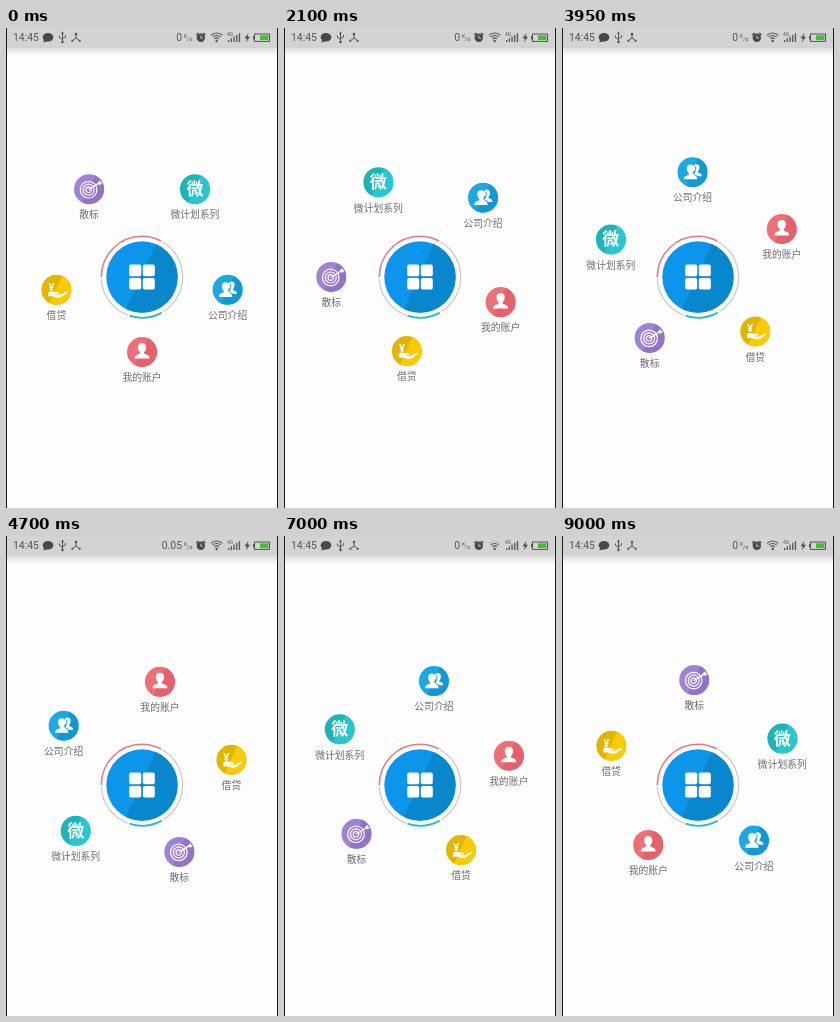
An HTML page with a canvas for the animation above (9.05 s loop, 272x480 px).

```html
<!DOCTYPE html>
<html lang="zh">
<head>
<meta charset="utf-8">
<style>
html, body { margin: 0; width: 100%; height: 100%; overflow: hidden; background: #fdfdfd; }
canvas { display: block; }
</style>
</head>
<body>
<canvas id="stage" width="272" height="480"></canvas>
<script>
const c = document.getElementById('stage').getContext('2d');
const LOOP = 9050, STEP = 50, TAU = 465, RAD = Math.PI / 180;
const CJK = '"Noto Sans CJK SC", "Noto Sans CJK", sans-serif';

// Each fling: start time and the angle it decays towards (counter-clockwise degrees)
const flings = [[1058, 474], [3109, 902.7], [4760, 1233], [5810, 1567.8], [7616, 1777.5]];

function turn(t) {
  let angle = 0;
  flings.forEach(([start, target], i) => {
    if (t <= start) return;
    const end = Math.min(t, i + 1 < flings.length ? flings[i + 1][0] : LOOP);
    angle = target - (target - angle) * Math.exp((start - end) / TAU);
  });
  return angle;
}

function disc(x, y, r, color) {
  c.fillStyle = color;
  c.beginPath();
  c.arc(x, y, r, 0, 7);
  c.fill();
}

function arc(x, y, r, from, to, color, width) {
  c.strokeStyle = color;
  c.lineWidth = width;
  c.beginPath();
  c.arc(x, y, r, from * RAD, to * RAD);
  c.stroke();
}

function shape(d, color) {
  c.fillStyle = color;
  c.fill(new Path2D(d));
}

function line(d, color, width) {
  c.strokeStyle = color;
  c.lineWidth = width;
  c.stroke(new Path2D(d));
}

function text(s, x, y, font, color, align = 'center') {
  c.font = font;
  c.fillStyle = color;
  c.textAlign = align;
  c.fillText(s, x, y);
}

// Disc with a second tone right of a diagonal
function twoTone(r, left, right) {
  disc(0, 0, r, left);
  c.save();
  c.beginPath();
  c.arc(0, 0, r, 0, 7);
  c.clip();
  c.beginPath();
  c.moveTo(r * .42, -r);
  c.lineTo(r, -r);
  c.lineTo(r, r);
  c.lineTo(-r * .5, r);
  c.fillStyle = right;
  c.fill();
  c.restore();
}

function person(color) {
  shape('M0-9C3-9 4.3-7 4.1-4.3C4-2.2 3-.8 2 .2V1.6L6 3.2Q7.5 4 7.5 6.5H-7.5Q-7.5 4-6 3.2L-2 1.6V.2C-3-.8-4-2.2-4.1-4.3C-4.3-7-3-9 0-9Z', color);
}

function target() {
  for (const r of [8.3, 5.5, 2.8]) arc(-.5, .5, r, 0, 360, '#fff', 1.2);
  line('M-.5 .5L10-6', '#fff', 1.4);
  shape('M8-6L11-9L11.5-7L13.5-6.5L11-4.2Z', '#fff');
}

function people() {
  c.save();
  c.translate(4, -1);
  c.scale(.72, .8);
  person('#fff');
  c.restore();
  c.save();
  c.translate(-2, 1);
  c.scale(.9, .95);
  c.lineWidth = 1;
  person('#fff');
  c.restore();
  line('M3-6Q4-2 1.5 1L2 2.5Q6 4 6 6', '#1599d5', .9);
}

function hand() {
  text('¥', -5, 1, 'bold 11px "Noto Sans", sans-serif', '#fff');
  shape('M-8 2.5Q-5 .8-2 2L2 2.8Q4 3.6 2.5 4.4L-1 4.4V5L4 5L9.5 1.8Q11.5 1.8 10.5 3.3L5 7.2Q3 8.3 0 7.6L-4 6.5L-8 6.7Z', '#fff');
}

const items = [
  ['公司介绍', '#1ba9e4', '#1298d4', people],
  ['我的账户', '#ee7076', '#e3626b', () => person('#fff')],
  ['借贷', '#e2b505', '#f9cb04', hand],
  ['散标', '#a083d4', '#9173c8', target],
  ['微计划系列', '#1cb4b8', '#2bc5cd', () => text('微', 0, 6, 'bold 17px ' + CJK, '#fff')]
];

function menu(t) {
  const angle = turn(t);
  items.forEach(([label, left, right, glyph], i) => {
    const a = (18 + 72 * i - angle) * RAD;
    c.save();
    c.translate(136 + 90 * Math.cos(a), 234 + 90 * Math.sin(a));
    twoTone(15, left, right);
    glyph();
    text(label, 0, 29.3, '9.8px ' + CJK, '#6b6b6b');
    c.restore();
  });
}

function hub() {
  c.save();
  c.translate(136, 249);
  arc(0, 0, 40.7, -60, 58, '#c9c9cc', 1.2);
  arc(0, 0, 40.7, 110, 178, '#c9c9cc', 1.2);
  arc(0, 0, 40.7, 180, 298, '#e37b80', 1.6);
  arc(0, 0, 40.7, 61, 108, '#27bcc6', 1.8);
  twoTone(35.7, '#0d95ec', '#0987cd');
  c.fillStyle = '#fff';
  for (const x of [-12.8, .8]) for (const y of [-12.4, 1]) {
    c.beginPath();
    c.roundRect(x, y, 12, 11.6, 1.8);
    c.fill();
  }
  c.restore();
}

function statusBar(t) {
  const ink = '#555';
  c.fillStyle = '#d3d3d3';
  c.fillRect(0, 0, 272, 20);
  const shade = c.createLinearGradient(0, 20, 0, 28);
  shade.addColorStop(0, '#dedede');
  shade.addColorStop(1, '#fdfdfd');
  c.fillStyle = shade;
  c.fillRect(0, 20, 272, 8);

  text('14:45', 7, 13.2, '10.4px Roboto, sans-serif', ink, 'left');
  // chat, usb, share
  c.fillStyle = '#484848';
  c.beginPath();
  c.ellipse(42, 9.3, 5.3, 4.3, 0, 0, 7);
  c.fill();
  shape('M38 11L37.5 14.5L42 13Z', '#484848');
  line('M56.5 5V14M53.5 7.5V9.5L56.5 11.5M59.5 7V9L56.5 10.5', ink, 1);
  shape('M56.5 3.5L58 6H55Z', ink);
  disc(56.5, 14, 1.3, ink);
  line('M70 6V10L66 13M70 10L74 13', ink, 1);
  disc(70, 6, 1.3, ink);
  disc(66.3, 12.8, 1.1, ink);
  disc(73.7, 12.8, 1.1, ink);

  const busy = t >= 4000 && t < 6000;
  text(busy ? '0.05' : '0', 176, 13.2, '10.4px Roboto, sans-serif', ink, 'right');
  text('K', 178, 10, '5px Roboto, sans-serif', ink, 'left');
  text('/s', 181, 13, '6px Roboto, sans-serif', ink, 'left');

  // alarm
  disc(194.8, 9.8, 4.2, '#484848');
  line('M190.3 7L192.5 5M199.3 7L197.1 5', '#484848', 1.4);
  line('M194.8 7.5V10.2H197', '#d3d3d3', .9);
  // wifi
  const weak = t >= 5000 && t < 7700;
  [[8, weak ? '#bbb' : ink], [5.5, ink], [3, ink]].forEach(([r, color]) =>
    arc(210.7, 13, r, 225, 315, color, 1.2));
  disc(210.7, 13, 1.2, ink);
  // signal
  text('4G', 221, 8, '5px Roboto, sans-serif', ink, 'left');
  c.fillStyle = ink;
  for (let i = 0; i < 5; i++) c.fillRect(222 + i * 2.7, 12 - i * 1.7, 1.3, 2 + i * 1.7);
  // battery
  shape('M242.5 5L238.5 10.3H241L239.8 14.5L244 8.8H241.4Z', '#484848');
  c.strokeStyle = ink;
  c.lineWidth = 1;
  c.strokeRect(248.5, 6, 15, 7.4);
  c.fillStyle = ink;
  c.fillRect(247, 8, 1.3, 3.4);
  c.fillStyle = '#3fc32c';
  c.fillRect(254, 7.3, 8.4, 4.8);
}

function draw(now) {
  const t = Math.floor(now % LOOP / STEP) * STEP;
  c.fillStyle = '#fdfdfd';
  c.fillRect(0, 0, 272, 480);
  statusBar(t);
  c.fillStyle = '#1c1c1c';
  c.fillRect(0, 0, 1, 480);
  c.fillRect(271, 0, 1, 480);
  hub();
  menu(t);
}

const begin = performance.now();
function tick() {
  draw(performance.now() - begin);
  requestAnimationFrame(tick);
}
tick();
</script>
</body>
</html>
```
